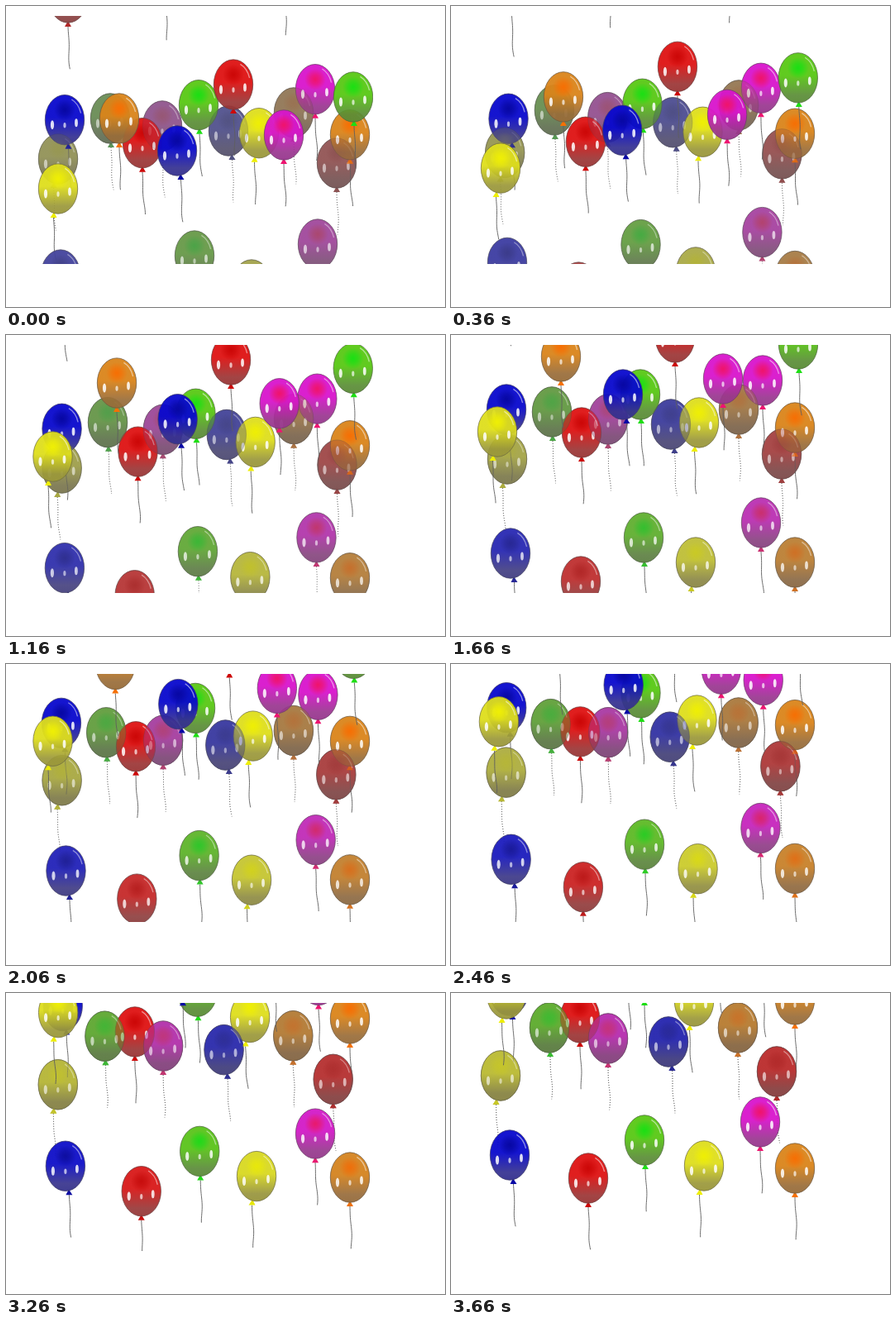
These frames come from a looping animation (531 px wide and 364 px high, 3.76 s). An HTML page with a canvas:

```html
<!DOCTYPE html>
<html lang="en">
<head>
<meta charset="utf-8">
<title>Balloons</title>
<style>
  html, body { margin: 0; width: 100%; height: 100%; overflow: hidden; background: #fff; }
  canvas { display: block; }
</style>
</head>
<body>
<canvas id="stage" width="531" height="364"></canvas>
<script>
const ctx = document.getElementById('stage').getContext('2d');
const LOOP = 3760, LAST = 37, MID = 17, REST = 8;

// body colour, warm spot near the top, sideways lean of the knot
const KINDS = {
  red:    { body: [222, 18, 18],  spot: [205, 8, 8],    lean: 0 },
  green:  { body: [88, 200, 20],  spot: [30, 222, 20],  lean: 1 },
  blue:   { body: [8, 8, 205],    spot: [8, 8, 165],    lean: 4.5 },
  yellow: { body: [222, 222, 28], spot: [238, 238, 5],  lean: -5.5 },
  orange: { body: [218, 132, 26], spot: [245, 112, 5],  lean: 0 },
  pink:   { body: [216, 20, 204], spot: [238, 20, 112], lean: 0 }
};

// Each group: vividness at start and end of the loop,
// and balloons as kind, x at start / middle / end, y at start / middle / end.
const leaving = { vivid: [.7, .7], balloons: [
  ['red', 75, 69, 64, -10, -73, -147],
  ['red', 193, 187, 182, -45, -108, -182],
  ['red', 337, 331, 326, -51, -114, -188] ] };
const faded = { vivid: [.3, .68], balloons: [
  ['yellow', 63, 68, 60, 185, 150, 100],
  ['green', 126, 122, 119, 136, 93, 42],
  ['pink', 189, 190, 190, 145, 102, 55],
  ['blue', 269, 266, 263, 151, 108, 59],
  ['orange', 348, 348, 347, 129, 90, 42],
  ['red', 400, 400, 394, 190, 144, 95] ] };
// these rest for a moment, so their y starts at REST
const resting = { vivid: [1, 1], rests: true, balloons: [
  ['blue', 71, 67, 70, 132, 90, -3],
  ['green', 233, 229, 233, 114, 72, -20],
  ['red', 165, 158, 156, 160, 118, 30],
  ['pink', 374, 377, 378, 95, 55, -33],
  ['yellow', 306, 300, 294, 148, 106, 10],
  ['orange', 416, 416, 416, 150, 112, 8] ] };
const quick = { vivid: [1, 1], balloons: [
  ['orange', 137, 133, 130, 136, 26, -100],
  ['blue', 207, 208, 210, 175, 72, -42],
  ['red', 275, 271, 268, 95, 3, -105],
  ['green', 420, 420, 423, 110, 11, -108],
  ['pink', 336, 329, 325, 156, 53, -62],
  ['yellow', 63, 56, 67, 221, 117, 1] ] };
const rising = { vivid: [.45, 1], balloons: [
  ['blue', 66, 72, 71, 325, 264, 196],
  ['red', 154, 157, 166, 352, 298, 224],
  ['green', 228, 233, 234, 302, 245, 178],
  ['yellow', 297, 296, 306, 337, 275, 209],
  ['pink', 377, 375, 374, 288, 227, 156],
  ['orange', 416, 416, 416, 344, 275, 212] ] };

const mix = (a, b, k) => a.map((v, i) => v + (b[i] - v) * k);
const rgb = (c, a = 1) => `rgba(${c.map(Math.round)},${a})`;
const white = a => rgb([255, 255, 255], a);

// Parabola through three values at steps from, MID and LAST
function curve(n, from, a, b, c) {
  const p = n - from, q = n - MID, r = n - LAST;
  return a * q * r / ((from - MID) * (from - LAST))
       + b * p * r / ((MID - from) * (MID - LAST))
       + c * p * q / ((LAST - from) * (LAST - MID));
}

function height(n, rests, ys) {
  if (!rests) return curve(n, 0, ...ys);
  if (n < REST) return ys[0] + 5.7 * (1 - (n / REST) ** 2);
  return curve(n, REST, ...ys);
}

function oval(x, y, rx, ry, fill) {
  ctx.beginPath();
  ctx.ellipse(x, y, rx, ry, 0, 0, 7);
  ctx.fillStyle = fill;
  ctx.fill();
}

function drawString(x, y, vivid, phase) {
  ctx.beginPath();
  ctx.moveTo(x, y);
  for (let u = 0; u <= 1; u += .05)
    ctx.lineTo(x + 2.5 * u + 1.3 * u * Math.sin(phase + u * 7), y + 54 * u);
  ctx.setLineDash(vivid < .7 ? [1, 2] : []);
  ctx.strokeStyle = rgb([95, 95, 95], .9);
  ctx.lineWidth = 1;
  ctx.stroke();
  ctx.setLineDash([]);
}

function drawBalloon(kind, x, y, vivid, phase) {
  const { body, spot, lean } = KINDS[kind];
  const grey = [115, 115, 115];
  const color = mix(grey, body, vivid), hot = mix(grey, spot, vivid);
  const low = mix(color, [92, 85, 85], .52);

  ctx.save();
  ctx.translate(x, y);
  drawString(lean, 35, vivid, phase);

  ctx.beginPath();
  ctx.moveTo(lean * .9, 28);
  ctx.lineTo(lean + 4, 35);
  ctx.lineTo(lean - 4, 35);
  ctx.fillStyle = rgb(hot);
  ctx.fill();

  const shade = ctx.createLinearGradient(0, -30, 0, 30);
  shade.addColorStop(0, rgb(color, .95));
  shade.addColorStop(.45, rgb(color, .95));
  shade.addColorStop(.85, rgb(low, .92));
  shade.addColorStop(1, rgb(low, .95));
  oval(0, 0, 23.7, 30.2, shade);
  ctx.strokeStyle = rgb(mix(low, [70, 70, 70], .5), .85);
  ctx.lineWidth = .9;
  ctx.stroke();

  const glow = ctx.createRadialGradient(0, -12, 1, 0, -12, 13);
  glow.addColorStop(0, rgb(hot));
  glow.addColorStop(.4, rgb(hot, .7));
  glow.addColorStop(1, rgb(hot, 0));
  oval(0, -12, 13, 13, glow);

  const shine = .5 + .35 * vivid;
  oval(-15, 6, 2.1, 5.5, white(shine));
  oval(0, 6.5, 1.6, 3.2, white(shine * .8));
  oval(14, 3.5, 1.9, 5, white(shine));

  ctx.beginPath();
  ctx.ellipse(0, 0, 20.5, 27, 0, -1.15, -.3);
  ctx.strokeStyle = white(shine * .6);
  ctx.lineWidth = 1.3;
  ctx.stroke();
  ctx.restore();
}

function drawGroup({ vivid: [from, to], rests, balloons }, n) {
  const vivid = from + (to - from) * n / LAST;
  for (const [kind, xa, xb, xc, ...ys] of balloons)
    drawBalloon(kind, curve(n, 0, xa, xb, xc), height(n, rests, ys), vivid, xa + n * .08);
}

function draw(n) {
  ctx.fillStyle = '#fff';
  ctx.fillRect(0, 0, 531, 364);
  ctx.save();
  ctx.beginPath();
  ctx.rect(31, 12, 413, 300);
  ctx.clip();
  for (const group of [leaving, faded, resting]) drawGroup(group, n);
  // the faded ones shimmer through those in front of them
  ctx.globalAlpha = .2 + .4 * n / LAST;
  drawGroup(faded, n);
  ctx.globalAlpha = 1;
  for (const group of [quick, rising]) drawGroup(group, n);
  ctx.restore();
}

const start = performance.now();
function tick() {
  const t = (performance.now() - start) % LOOP;
  draw(t < 60 ? 0 : Math.floor((t - 60) / 100) + 1);
  requestAnimationFrame(tick);
}
tick();
</script>
</body>
</html>
```
